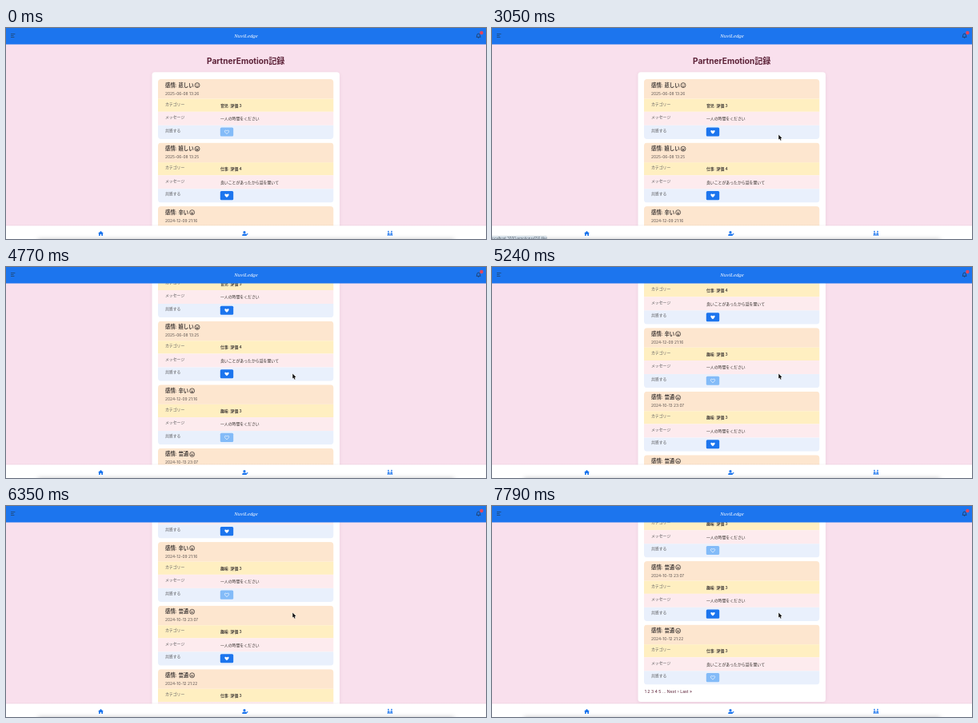
An HTML page with a canvas that plays this animation: 600x264 px, repeating every 7830 ms.

```html
<!DOCTYPE html>
<html lang="ja">
<head>
<meta charset="utf-8">
<title>PartnerEmotion記録</title>
<style>
html, body { margin: 0; width: 100%; height: 100%; overflow: hidden; background: #f9e0ed; }
canvas { display: block; width: 600px; height: 264px; }
</style>
</head>
<body>
<canvas id="stage"></canvas>
<script>
const W = 600, H = 264, LOOP = 7830;
const SANS = 'Inter, "Noto Sans CJK JP", "Noto Sans CJK", sans-serif';
const BLUE = '#1c75ee', PALE = '#83bbf8', INK = '#48413e', WINE = '#5c2137';
const PITCH = 79.55;

const cards = [
  { mood: '悲しい', date: '2025-06-08 13:26', topic: '育児: 評価 3', note: 0, face: 'calm' },
  { mood: '嬉しい', date: '2025-06-08 13:25', topic: '仕事: 評価 4', note: 1, face: 'grin', liked: true },
  { mood: '辛い', date: '2024-12-09 21:16', topic: '趣味: 評価 3', note: 0, face: 'open' },
  { mood: '普通', date: '2024-10-13 23:07', topic: '趣味: 評価 3', note: 0, face: 'tongue', liked: true },
  { mood: '普通', date: '2024-10-12 21:22', topic: '仕事: 評価 3', note: 1, face: 'tongue' }
];
const notes = ['一人の時間をください', '良いことがあったから話を聞いて'];
const bands = [[0, 24.6, '#fde6cf'], [24.6, 16.2, '#ffefc1'], [40.8, 17, '#fdebee'], [57.8, 17.2, '#e9f0fc']];

const canvas = document.getElementById('stage');
const ctx = canvas.getContext('2d');
const dpr = window.devicePixelRatio || 1;
canvas.width = W * dpr;
canvas.height = H * dpr;

const clamp = v => Math.min(1, Math.max(0, v));
const span = (t, a, b) => clamp((t - a) / (b - a));
const smooth = u => u * u * (3 - 2 * u);
const easeOut = u => 1 - Math.pow(1 - u, 2.2);
const mix = (a, b, u) => a + (b - a) * u;

function rect(x, y, w, h, color) {
  ctx.fillStyle = color;
  ctx.fillRect(x, y, w, h);
}

function rounded(x, y, w, h, r) {
  ctx.beginPath();
  ctx.roundRect(x, y, w, h, r);
}

function disc(x, y, r, color) {
  ctx.fillStyle = color;
  ctx.beginPath();
  ctx.arc(x, y, r, 0, Math.PI * 2);
  ctx.fill();
}

function text(str, x, y, size, color, weight = 400, align = 'left', family = SANS) {
  ctx.font = `${weight} ${size}px ${family}`;
  ctx.fillStyle = color;
  ctx.textAlign = align;
  ctx.textBaseline = 'alphabetic';
  ctx.fillText(str, x, y + size * 0.37);
  return ctx.measureText(str).width;
}

function poly(points) {
  ctx.beginPath();
  points.forEach(([x, y]) => ctx.lineTo(x, y));
  ctx.closePath();
}

function at(x, y, draw) {
  ctx.save();
  ctx.translate(x, y);
  draw();
  ctx.restore();
}

function heart(x, y, filled) {
  at(x, y, () => {
    ctx.beginPath();
    ctx.moveTo(0, 2.3);
    ctx.bezierCurveTo(-4.6, -0.8, -2.2, -3.6, 0, -1.4);
    ctx.bezierCurveTo(2.2, -3.6, 4.6, -0.8, 0, 2.3);
    ctx.fillStyle = ctx.strokeStyle = '#fff';
    ctx.lineWidth = 0.65;
    if (filled) ctx.fill(); else ctx.stroke();
  });
}

function face(x, y, kind) {
  at(x, y, () => {
    ctx.strokeStyle = INK;
    ctx.lineWidth = 0.85;
    ctx.beginPath();
    ctx.arc(0, 0, 3, 0, Math.PI * 2);
    ctx.stroke();
    disc(-1.1, -0.8, 0.5, INK);
    disc(1.1, -0.8, 0.5, INK);
    ctx.beginPath();
    if (kind === 'calm') {
      ctx.arc(0, 0.3, 1.4, 0.35, Math.PI - 0.35);
      ctx.stroke();
    } else if (kind === 'open') {
      ctx.ellipse(0, 1.25, 1.2, 0.85, 0, 0, Math.PI * 2);
      ctx.fill();
    } else {
      ctx.arc(0, 0.4, 1.7, 0, Math.PI);
      ctx.fill();
      if (kind === 'tongue') disc(0, 1.7, 0.65, '#fde6cf');
    }
  });
}

function drawCard(card, top, hovered, liked) {
  ctx.save();
  rounded(190, top, 219.3, 75, 4);
  ctx.clip();
  bands.forEach(([y, h, color]) => rect(190, top + y, 220, h, color));
  ctx.restore();

  const w = text('感情: ' + card.mood, 199, top + 7.2, 6.4, INK, 600);
  face(199 + w + 4.4, top + 7.6, card.face);
  text(card.date, 199, top + 17.8, 4.88, '#5d5552');
  ['カテゴリー', 'メッセージ', '共感する'].forEach((label, i) =>
    text(label, 199, top + 30.8 + i * 16.5, 4.88, '#59595c'));
  text(card.topic, 268, top + 32.8, 4.88, '#46403b', 600);
  text(notes[card.note], 268, top + 49.3, 4.88, '#332f2c', 500);

  rounded(267.8, top + 60.5, 16.4, 11.1, 1.5);
  ctx.fillStyle = liked || hovered ? BLUE : PALE;
  ctx.fill();
  heart(276, top + 66.2, liked);
}

function drawPage(t, scroll) {
  rect(0, 0, W, H, '#f9e0ed');
  ctx.save();
  ctx.translate(0, -scroll);
  text('PartnerEmotion記録', 299.7, 41, 10.1, WINE, 700, 'center');

  ctx.shadowColor = 'rgba(120,60,90,.1)';
  ctx.shadowBlur = 4 * dpr;
  ctx.shadowOffsetY = dpr;
  rounded(182.5, 55.2, 234.5, 423.3, 3.5);
  ctx.fillStyle = '#fff';
  ctx.fill();
  ctx.shadowColor = 'transparent';

  const hovered = cursorAt(t).over;
  cards.forEach((card, i) => {
    const first = i === 0;
    drawCard(card, 64 + i * PITCH, first && hovered, card.liked || (first && t > 2350));
  });
  text('1 2 3 4 5 … Next › Last »', 190.7, 465.8, 5.2, WINE);
  ctx.restore();
}

function drawHeader() {
  rect(0, 0, W, 20.5, BLUE);
  text('NuviLedge', 300, 9, 6.8, '#fff', 'italic', 'center', '"Liberation Serif", "Noto Serif", serif');

  [0, 1, 2].forEach(i => rect(6, 7.2 + i * 2, [5.4, 3.6, 4.4][i], 0.7, '#22405f'));

  at(590.6, 9.6, () => {
    ctx.beginPath();
    ctx.moveTo(-2.6, 1.7);
    ctx.quadraticCurveTo(-1.8, 0.8, -1.8, -0.7);
    ctx.arc(0, -0.7, 1.8, Math.PI, 0);
    ctx.quadraticCurveTo(1.8, 0.8, 2.6, 1.7);
    ctx.closePath();
    ctx.strokeStyle = '#203a5c';
    ctx.lineWidth = 0.8;
    ctx.stroke();
    disc(0, 2.5, 0.7, '#203a5c');
  });
  disc(594.4, 6, 2.2, '#e4455a');
}

function drawFooter() {
  const shade = ctx.createLinearGradient(0, 245.5, 0, 247.5);
  shade.addColorStop(0, 'rgba(120,80,100,0)');
  shade.addColorStop(1, 'rgba(120,80,100,.08)');
  rect(0, 245.5, W, 2, shade);
  rect(0, 247.4, W, 17, '#fff');

  ctx.save();
  ctx.shadowColor = 'rgba(120,120,125,.6)';
  ctx.shadowBlur = 6 * dpr;
  rect(40, 265, 520, 6, '#ccc');
  ctx.restore();

  at(118.5, 257, () => {
    ctx.fillStyle = BLUE;
    poly([[-3.4, 0], [0, -3], [3.4, 0], [2.5, 0.3], [2.5, 3], [0.8, 3], [0.8, 1], [-0.8, 1], [-0.8, 3], [-2.5, 3], [-2.5, 0.3]]);
    ctx.fill();
  });
  at(298.6, 257, () => {
    disc(-0.6, -1.5, 1.6, BLUE);
    rounded(-3.4, 0.6, 5.2, 2.5, [2, 0.6, 0.4, 0.4]);
    ctx.fill();
    ctx.strokeStyle = BLUE;
    ctx.lineWidth = 1.2;
    ctx.beginPath();
    ctx.moveTo(1.3, 2.7);
    ctx.lineTo(3.6, 0.2);
    ctx.stroke();
  });
  at(480, 257, () => {
    ctx.strokeStyle = BLUE;
    ctx.lineWidth = 1;
    [-1, 1].forEach(s => {
      disc(s * 2, -2.3, 0.9, BLUE);
      ctx.beginPath();
      ctx.moveTo(s * 0.3, 0.2);
      ctx.lineTo(s * 2.4, -0.4);
      ctx.lineTo(s * 2.6, 3);
      ctx.moveTo(s * 2.4, 1.1);
      ctx.lineTo(s * 0.8, 1.1);
      ctx.lineTo(s * 0.8, 3);
      ctx.stroke();
    });
  });
}

function drawStatus() {
  rounded(-2, 260.4, 70.5, 6, 1.2);
  ctx.fillStyle = '#dbe5ee';
  ctx.fill();
  ctx.strokeStyle = '#aebac5';
  ctx.lineWidth = 0.4;
  ctx.stroke();
  text('localhost:3000/emotions/656/like', -1, 263, 4.4, '#4a5663');
}

// Glide in, pause beside the button, step onto it, then move away.
function cursorAt(t) {
  const enter = easeOut(span(t, 950, 1600));
  const step = easeOut(span(t, 1700, 1900));
  const leave = smooth(span(t, 2620, 3030));
  const x = mix(mix(mix(606, 298, enter), 280.5, step), 358.3, leave);
  const y = mix(mix(mix(176, 135, enter), 128.8, step), 133.6, leave);
  return { x, y, over: x < 284.2 };
}

function drawCursor(t) {
  const { x, y, over } = cursorAt(t);
  at(x, y, () => {
    ctx.fillStyle = '#111';
    ctx.strokeStyle = '#fff';
    ctx.lineWidth = 0.8;
    ctx.lineJoin = 'round';
    if (over) {
      poly([[-0.7, 0], [0.5, 0], [0.7, 1.9], [3.6, 2.4], [4, 3.6], [3.2, 6], [0.2, 6], [-2, 3.4], [-1.5, 2.9], [-0.6, 3.4]]);
    } else {
      poly([[0, 0], [0, 6], [1.3, 4.9], [2.3, 7.1], [3.3, 6.6], [2.4, 4.5], [4.2, 4.3]]);
    }
    ctx.stroke();
    ctx.fill();
  });
}

// Three separate flicks, each slowing to rest: start, end, distance.
const flicks = [[4055, 4820, 76], [4905, 5710, 102], [6450, 7310, 55.6]];
const scrollAt = t => flicks.reduce((sum, [a, b, d]) => sum + d * easeOut(span(t, a, b)), 0);

function render(t) {
  ctx.setTransform(dpr, 0, 0, dpr, 0, 0);
  drawPage(t, scrollAt(t));
  drawHeader();
  drawFooter();
  if (t > 1900 && t < 3340) drawStatus();
  drawCursor(t);
}

const start = performance.now();
function tick() {
  render((performance.now() - start) % LOOP);
  requestAnimationFrame(tick);
}
tick();
</script>
</body>
</html>
```
